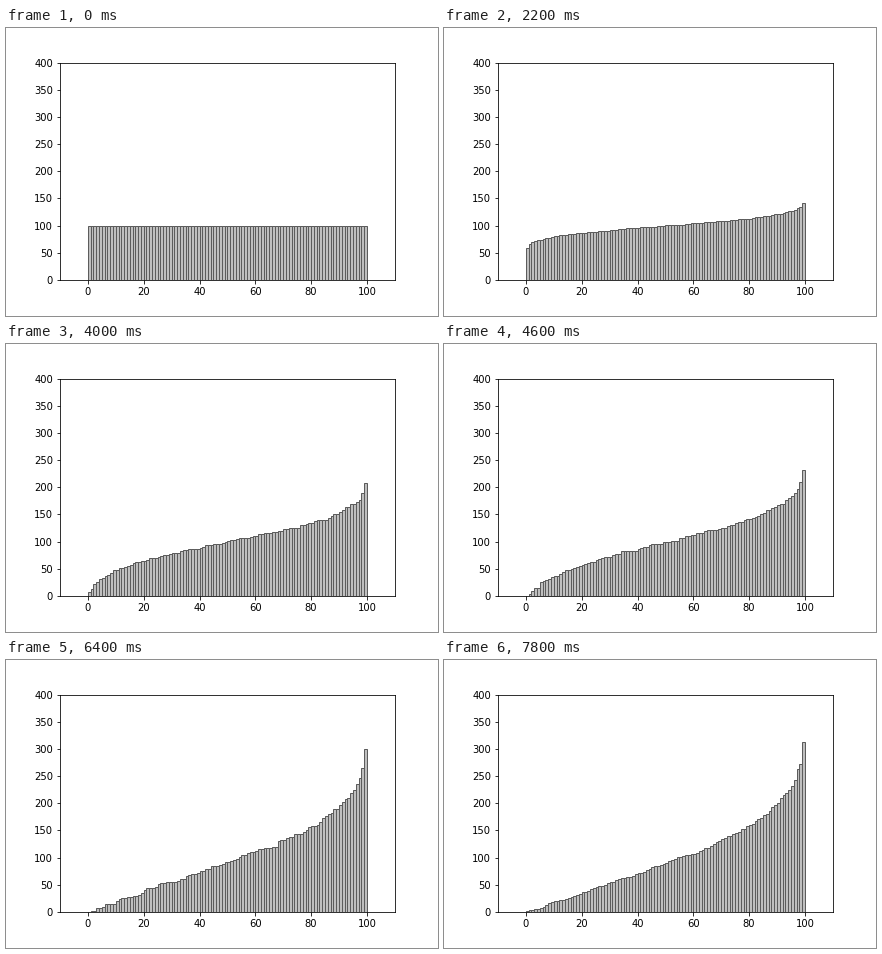
A matplotlib script that plays this animation: 432 px wide and 288 px high, repeating every 8000 ms.

```python
from math import erf, sqrt

import numpy as np
import matplotlib.pyplot as plt
from matplotlib.animation import FuncAnimation

PEOPLE = 100
MEAN = 100
FRAMES = 40
STEP_MS = 200


def normal_quantiles(n):
    """Evenly spread ranks of a standard normal distribution."""
    x = np.linspace(-4, 4, 801)
    cdf = [(1 + erf(v / sqrt(2))) / 2 for v in x]
    return np.interp((np.arange(n) + 0.5) / n, cdf, x)


def spread(k):
    """Width of the wealth distribution: slow, then fast, then settling."""
    return np.interp(k, [0, 6, 11, 16, 23, 29, 32, 39],
                     [0, 8, 16, 28, 51, 80, 91, 105])


def wealth(k):
    """Sorted wealth: a random walk reflected at zero, total kept constant."""
    noise = np.random.default_rng(k).normal(0, 0.04, PEOPLE)
    money = np.abs(MEAN + spread(k) * (Z + noise))
    return np.sort(np.round(money * MEAN / money.mean()))


Z = normal_quantiles(PEOPLE)

fig = plt.figure(figsize=(6, 4), dpi=72, facecolor="white")
fig.subplots_adjust(left=0.125, right=0.9, bottom=0.125, top=0.88)
ax = fig.add_subplot()
bars = ax.bar(np.arange(PEOPLE) + 0.5, wealth(0), width=1,
              color="0.75", edgecolor="0.36", linewidth=1)
ax.set_xlim(-10, 110)
ax.set_ylim(0, 400)


def draw(k):
    for bar, height in zip(bars, wealth(k)):
        bar.set_height(height)
    return bars


anim = FuncAnimation(fig, draw, frames=FRAMES, interval=STEP_MS, repeat=True)
plt.show()
```
